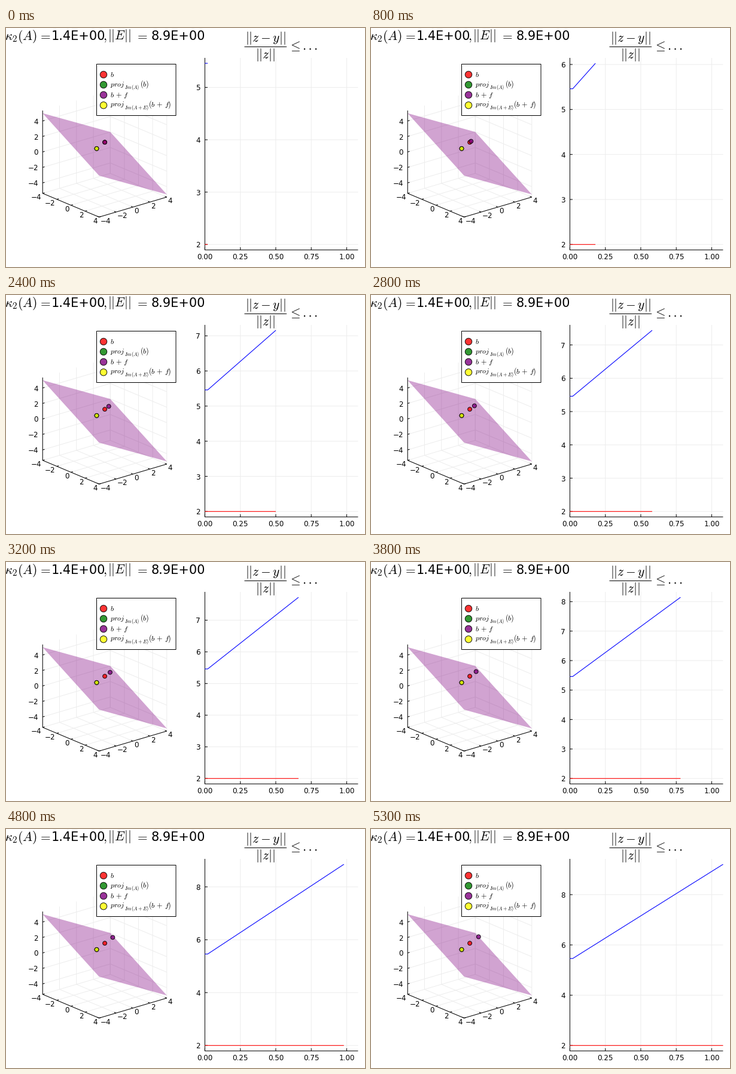
Recreate the animation shown at these times as a matplotlib script. Size 600 by 400 pixels, loop 5400 ms.

```python
import matplotlib.pyplot as plt
import numpy as np
from matplotlib.animation import FuncAnimation
from matplotlib.patches import Circle, Polygon, Rectangle

FRAMES, INTERVAL = 54, 100
LEFT, RIGHT, TOP, BOTTOM = 332.4, 588.4, 50.0, 371.4
X_MAX, LOW, START, SLOPE = 1.08, 2.0, 5.46, 3.535
TICK_PT, LEGEND_PT, SUB_PT, TITLE_PT, MATH_PT = 8.6, 8.7, 6.1, 15.0, 15.4
GRID = "#ededed"

plt.rcParams["font.family"] = "DejaVu Sans"
plt.rcParams["mathtext.fontset"] = "cm"

fig = plt.figure(figsize=(6, 4), dpi=100, facecolor="white")
ax = fig.add_axes([0, 0, 1, 1])
ax.set_xlim(0, 600)
ax.set_ylim(400, 0)
ax.axis("off")


def line(points, color="black", width=1.0, z=2):
    """Polyline in stage pixels; width is in pixels too."""
    xs, ys = zip(*points)
    return ax.plot(xs, ys, color=color, lw=width * 0.72, zorder=z,
                   solid_capstyle="butt", snap=False)[0]


def label(x, y, text, size=TICK_PT, ha="center", va="center_baseline", z=3):
    return ax.text(x, y, text, fontsize=size, ha=ha, va=va, zorder=z)


def math(x, y, text, size=MATH_PT, ha="left", z=3):
    return label(x, y, f"${text}$", size, ha, "baseline", z)


def dot(x, y, color, radius, z):
    marker = Circle((x, y), radius, facecolor=color, edgecolor=(0, 0, 0, 0.9),
                    lw=0.72, zorder=z)
    return ax.add_patch(marker)


def tint(r, g, b, alpha=0.8):
    return (r / 255, g / 255, b / 255, alpha)


def signed(v):
    return str(v).replace("-", "\u2212")


RED, GREEN = tint(255, 0, 0), tint(0, 128, 0)
PURPLE, YELLOW = tint(128, 0, 128), tint(255, 255, 0)

# 3D scene, projected in parallel
X_DIR = np.array([94.4, 39.7]) / 8
Y_DIR = np.array([113.1, -33.4]) / 8
Z_DIR = np.array([0.0, -12.95])
ORIGIN = np.array([164.95, 210.57])
Z_LIM = 5.35


def project(x, y, z):
    return ORIGIN + x * X_DIR + y * Y_DIR + z * Z_DIR


def tick(point, direction, length=3.5):
    step = direction / np.hypot(*direction) * length
    line([point, point + step])


def draw_scene():
    ticks = range(-4, 5, 2)
    for v in ticks:
        line([project(v, -4, -Z_LIM), project(v, 4, -Z_LIM),
              project(v, 4, Z_LIM)], GRID, z=1)
        line([project(4, v, -Z_LIM), project(-4, v, -Z_LIM),
              project(-4, v, Z_LIM)], GRID, z=1)
        line([project(-4, -4, v), project(-4, 4, v), project(4, 4, v)],
             GRID, z=1)

    corners = [project(x, y, -(x + y) * 0.625)
               for x, y in ((-4, -4), (-4, 4), (4, 4), (4, -4))]
    ax.add_patch(Polygon(corners, facecolor=tint(128, 0, 128, 0.36),
                         edgecolor="none", zorder=1.5))

    line([project(-4, -4, Z_LIM), project(-4, -4, -Z_LIM),
          project(4, -4, -Z_LIM), project(4, 4, -Z_LIM)])
    for v in ticks:
        px, py, pz = (project(v, -4, -Z_LIM), project(4, v, -Z_LIM),
                      project(-4, -4, v))
        tick(px, Y_DIR)
        tick(py, -X_DIR)
        tick(pz, Y_DIR)
        label(px[0] - 2.2, px[1] + 6.8, signed(v), ha="right", va="center")
        label(py[0] + 1.8, py[1] + 6.8, signed(v), ha="left", va="center")
        label(54, pz[1], signed(v), ha="right")


def projection_label(y, sub, tail_x, tail):
    math(174.5, y, "proj", LEGEND_PT, z=7)
    math(198, y + 4.3, sub, SUB_PT, z=7)
    math(tail_x, y, tail, LEGEND_PT, z=7)


def draw_legend():
    ax.add_patch(Rectangle((151.5, 60.5), 132.5, 86, facecolor="white",
                           edgecolor="black", lw=0.72, zorder=6, snap=False))
    for y, color in ((78, RED), (95, GREEN), (112, PURPLE), (129.3, YELLOW)):
        dot(163, y, color, 5.7, 7)
    math(174, 82, "b", LEGEND_PT, z=7)
    projection_label(97.5, "Im(A)", 223.5, "(b)")
    math(174, 116, r"b\,+\,f", LEGEND_PT, z=7)
    projection_label(131.3, "Im(A+E)", 238.2, r"(b\,+\,f)")


def draw_titles():
    base = 19.5
    math(-2.5, base, r"\kappa_2(A)")
    math(65, base, "=", ha="center")
    label(75.5, base, "1.4E+00", TITLE_PT, "left", "baseline")
    math(162.5, base, ",")
    math(170.5, base, "||E||")
    math(227, base, "=", ha="center")
    label(242.4, base, "8.9E+00", TITLE_PT, "left", "baseline")

    math(433.6, 22.5, "||z-y||", ha="center")
    line([(398.5, 31.5), (469, 31.5)])
    math(433.3, 51.5, "||z||", ha="center")
    math(482.5, 36.5, r"\leq", ha="center")
    for x in (499, 508.5, 518):
        ax.add_patch(Circle((x, 35.2), 1.2, color="black", lw=0))


def plot_x(x):
    return LEFT + (RIGHT - LEFT) * x / X_MAX


def draw_axes():
    for v in np.arange(0, 1.01, 0.25):
        x = plot_x(v)
        line([(x, TOP), (x, BOTTOM)], GRID, z=1)
        line([(x, BOTTOM), (x, BOTTOM - 4.5)])
        label(x, 386.9, f"{v:.2f}", va="baseline")
    line([(LEFT, TOP), (LEFT, BOTTOM), (RIGHT, BOTTOM)])


draw_scene()
draw_legend()
draw_titles()
draw_axes()

B, PROJ = np.array([165.1, 191.2]), (151.5, 201.8)
F_STEP = np.array([0.277, -0.204])
dot(*B, RED, 3.4, 3)
dot(*PROJ, GREEN, 3.4, 3.1)
moving = dot(*B, PURPLE, 3.4, 3.2)
dot(*PROJ, YELLOW, 3.4, 3.3)

y_ticks = {
    v: (line([(LEFT, 0), (RIGHT, 0)], GRID, z=1),
        line([(LEFT, 0), (LEFT + 4.5, 0)]),
        label(325, 0, str(v), ha="right"))
    for v in range(2, 9)
}
bound = line([(0, 0)], "blue", 1.1, 4)
error = line([(0, 0)], "red", 1.1, 4)


def update(n):
    high = START + SLOPE * 0.02 * n
    span = high - LOW
    floor, top = LOW - 0.03 * span, high + 0.03 * span

    def plot_y(v):
        return BOTTOM - (BOTTOM - TOP) * (v - floor) / (top - floor)

    step = 2 if top >= 9 else 1
    for v, (grid, mark, text) in y_ticks.items():
        y = plot_y(v)
        shown = v <= top and v % step == 0
        for artist in (grid, mark, text):
            artist.set_visible(shown)
        grid.set_ydata([y, y])
        mark.set_ydata([y, y])
        text.set_y(y)

    end = plot_x(0.02 * (n + 1))
    bound.set_data([LEFT, plot_x(0.02), end],
                   [plot_y(START), plot_y(START), plot_y(high)])
    error.set_data([LEFT, end], [plot_y(LOW)] * 2)
    moving.center = tuple(B + n * F_STEP)
    return bound, error, moving


anim = FuncAnimation(fig, update, frames=FRAMES, interval=INTERVAL,
                     repeat=True, repeat_delay=0)
plt.show()
```
